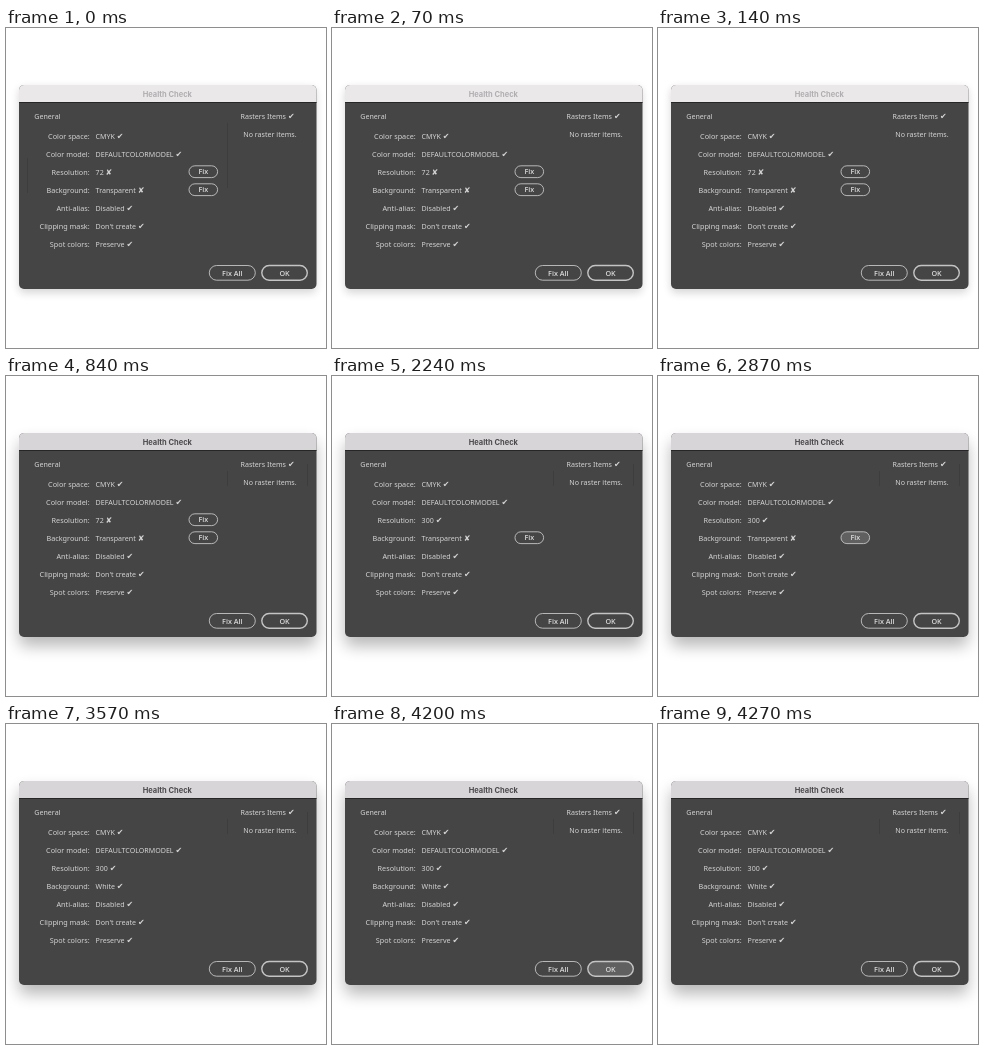
Write an HTML page that moves like this. It is 320 px wide and 320 px high and loops after 5.25 s.

```html
<!DOCTYPE html>
<html lang="en">
<head>
<meta charset="utf-8">
<title>Health Check</title>
<style>
  html, body { margin: 0; width: 100%; height: 100%; overflow: hidden; background: #fff; }
  svg { display: block; width: 100vw; height: 100vh; }
  text { font: 7.1px "Noto Sans", "Open Sans", "DejaVu Sans", sans-serif; fill: #d4d4d4; }
  .mark { font-family: "DejaVu Sans", sans-serif; font-size: 8px; }
  .label { font-size: 7.25px; text-anchor: end; }
  .title { font: 700 7.5px Inter, "Liberation Sans", sans-serif; text-anchor: middle; }
  .button text { font: 600 7.2px "Open Sans", "Noto Sans", sans-serif; text-anchor: middle; fill: #dadada; }
  .button rect { fill: #454545; stroke: #c4c4c4; }
  .button.pressed rect { fill: #606060; }
  .edge { stroke: #3d3d3d; stroke-width: 1; }
</style>
</head>
<body>
<svg id="stage" viewBox="0 0 320 320">
  <defs>
    <filter id="soft" x="-20%" y="-20%" width="140%" height="150%"><feGaussianBlur stdDeviation="4.5"/></filter>
    <filter id="deep" x="-20%" y="-20%" width="140%" height="150%"><feGaussianBlur stdDeviation="8"/></filter>
    <clipPath id="frame"><rect x="13" y="57" width="297.5" height="204" rx="5"/></clipPath>
  </defs>
  <rect width="320" height="320" fill="#fff"/>
  <rect id="idleShadow" x="13" y="60" width="297" height="205" rx="5" opacity=".16" filter="url(#soft)"/>
  <rect id="activeShadow" x="13" y="66" width="297" height="204" rx="5" opacity=".28" filter="url(#deep)"/>
  <g clip-path="url(#frame)">
    <rect x="13" y="57" width="298" height="204" fill="#454545"/>
    <rect id="bar" x="13" y="57" width="298" height="17"/>
    <rect x="13" y="74" width="298" height="1" fill="#262626"/>
  </g>
  <text id="title" class="title" x="161.3" y="69">Health Check</text>
  <g id="content"></g>
</svg>
<script>
const LOOP = 5250;
const NS = "http://www.w3.org/2000/svg";
const byId = id => document.getElementById(id);
const content = byId("content");

function add(parent, tag, attrs, text = "") {
  const node = document.createElementNS(NS, tag);
  for (const key in attrs) node.setAttribute(key, attrs[key]);
  node.textContent = text;
  parent.append(node);
  return node;
}

function status(x, y, value, mark) {
  const node = add(content, "text", { x, y }, value + " ");
  const sign = add(node, "tspan", { class: "mark" }, mark);
  return (newValue, newMark) => {
    node.firstChild.data = newValue + " ";
    sign.textContent = newMark;
  };
}

function button(x, y, width, height, caption, stroke = 0.9) {
  const group = add(content, "g", { class: "button" });
  add(group, "rect", { x, y, width, height, rx: height / 2, "stroke-width": stroke });
  add(group, "text", { x: x + width / 2, y: y + height / 2 + 2.7 }, caption);
  return group;
}

const edge = (x, y1, y2) => add(content, "line", { class: "edge", x1: x, x2: x, y1, y2 });
const show = (node, visible) => node.setAttribute("visibility", visible ? "visible" : "hidden");

const startEdges = [edge(221.5, 95, 160), edge(21.5, 130, 165)];
const activeEdges = [edge(221.5, 95, 110), edge(301.5, 88, 110)];

add(content, "text", { x: 28.3, y: 90.8 }, "General");
status(234.5, 90.8, "Rasters Items", "✔");
add(content, "text", { x: 237.3, y: 108.8 }, "No raster items.");

const [, , setResolution, setBackground] = [
  ["Color space:", "CMYK", "✔"],
  ["Color model:", "DEFAULTCOLORMODEL", "✔"],
  ["Resolution:", "72", "✘"],
  ["Background:", "Transparent", "✘"],
  ["Anti-alias:", "Disabled", "✔"],
  ["Clipping mask:", "Don't create", "✔"],
  ["Spot colors:", "Preserve", "✔"]
].map(([label, value, mark], i) => {
  const y = 110.7 + i * 18;
  add(content, "text", { class: "label", x: 83.7, y }, label);
  return status(89.6, y, value, mark);
});

const fixResolution = button(183, 137.8, 28.6, 11.8, "Fix");
const fixBackground = button(183, 155.8, 28.6, 11.8, "Fix");
button(203.3, 237.5, 46, 14.7, "Fix All");
const ok = button(255.8, 237.5, 45.5, 14.7, "OK", 1.4);

function render(t) {
  const active = t >= 840;
  const sharp = t >= 2240;
  const white = t >= 3570;
  show(byId("idleShadow"), !active);
  show(byId("activeShadow"), active);
  byId("bar").setAttribute("fill", active ? "#d8d5d8" : "#ebe8ea");
  byId("title").style.fill = active ? "#4b4a4b" : "#b0aeb0";
  startEdges.forEach(line => show(line, t < 70));
  activeEdges.forEach(line => show(line, active));
  setResolution(sharp ? "300" : "72", sharp ? "✔" : "✘");
  setBackground(white ? "White" : "Transparent", white ? "✔" : "✘");
  show(fixResolution, !sharp);
  show(fixBackground, !white);
  fixBackground.classList.toggle("pressed", t >= 2870 && !white);
  ok.classList.toggle("pressed", t >= 4200 && t < 4270);
}

const start = performance.now();
function tick() {
  render((performance.now() - start) % LOOP);
  requestAnimationFrame(tick);
}
tick();
</script>
</body>
</html>
```
